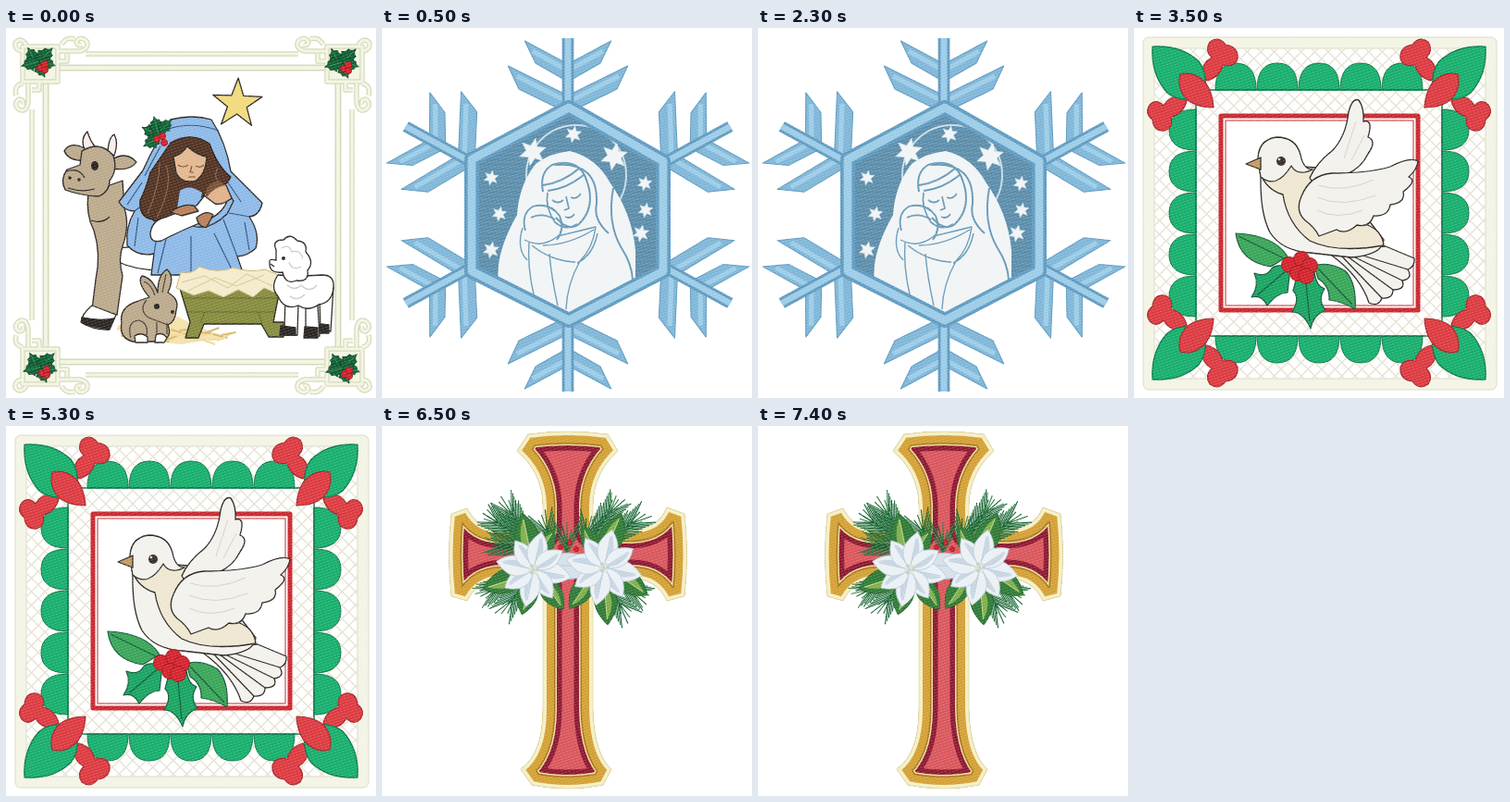
Write an HTML page that moves like this. It is 400 px wide and 400 px high and loops after 8000 ms.

```html
<!DOCTYPE html>
<html lang="en">
<head>
<meta charset="utf-8">
<title>Christmas embroidery</title>
<style>
html, body { margin: 0; width: 100%; height: 100%; overflow: hidden; background: #fff; }
svg { display: block; width: 100%; height: 100%; }
</style>
</head>
<body>
<svg id="stage" viewBox="0 0 400 400" fill="none" stroke-linejoin="round"></svg>
<script>
const path = (d, fill = 'none', stroke = 'none', width = 1.2, more = '') =>
  `<path d="${d}" fill="${fill}" stroke="${stroke}" stroke-width="${width}" ${more}/>`;
const dot = (x, y, r, fill, stroke = 'none', ry = r) =>
  `<ellipse cx="${x}" cy="${y}" rx="${r}" ry="${ry}" fill="${fill}" stroke="${stroke}"/>`;
const group = (transform, s) => `<g transform="${transform}">${s}</g>`;
const inked = (d, fill) => path(d, fill, '#292522', 1.3);
const satin = (d, dark, light, w) => path(d, 'none', dark, w) + path(d, 'none', light, w * .55);
const range = (n, f) => Array.from({ length: n }, (_, i) => f(i)).join('');
// Repeats a top-left motif in all four corners around (cx, cy).
const corners = (s, cx, cy) => [[1, 1], [-1, 1], [1, -1], [-1, -1]].map(([a, b]) =>
  group(`translate(${cx} ${cy}) scale(${a} ${b}) translate(${-cx} ${-cy})`, s)).join('');

function star(x, y, r, inner, n, turn = 0) {
  return 'M' + Array.from({ length: 2 * n }, (_, i) => {
    const a = turn + i * Math.PI / n, q = i % 2 ? inner : r;
    return `${(x + q * Math.sin(a)).toFixed(1)},${(y - q * Math.cos(a)).toFixed(1)}`;
  }).join('L') + 'Z';
}

const hollyLeaf = (x, y, turn, size) => group(`translate(${x} ${y}) rotate(${turn}) scale(${size})`,
  path('M0 0L4-6Q7-4 9-8Q11-4 15-5Q15-1 20 0Q15 1 15 5Q11 4 9 8Q7 4 4 6Z', '#0d5f33', '#07401f', .8) +
  path('M1 0H17', 'none', '#35915a', .8));
const berries = (list, r) => list.map(([x, y]) => dot(x, y, r, '#d3222b', '#a5121b')).join('');

function nativity() {
  const tan = '#bba98b', blue = '#8db9e8', edge = '#d3d9b8', pale = '#f3f5e2';
  const line = d => satin(d, edge, pale, 5.5);
  const frame = line('M28 88V316M374 88V316M86 28H316M86 375H316') +
    satin('M43 43H359V361H43Z', edge, pale, 7) +
    corners(path('M18 20H56V58H18Z', '#f3f5e2') +
      line('M18 20H56V58H18ZM57 25H80Q91 22 87 14Q80 8 76 15Q77 20 82 18M60 18Q65 9 74 12M24 60V80Q22 92 14 88Q7 82 14 77Q20 77 18 83M18 60Q8 62 11 73M18 25Q9 24 10 16Q16 9 22 18M56 36H66V28M36 58V67H28'), 201.5, 202.5) +
    [[36, 36], [364, 37], [38, 366], [365, 367]].map(([x, y]) =>
      hollyLeaf(x - 3, y + 3, -118, 1) + hollyLeaf(x - 2, y + 2, -45, 1.15) + hollyLeaf(x - 2, y, 65, .95) +
      hollyLeaf(x, y, 165, 1) + hollyLeaf(x, y, 15, .9) +
      berries([[x + 1, y + 7], [x + 6, y + 9], [x + 6, y + 3]], 3.6)).join('');

  const cow = inked('M112 240Q145 232 168 245V262Q140 262 119 252Z', '#fff') +
    inked('M89 178Q86 202 95 219Q103 244 97 272L93 304L120 310L126 268Q121 250 126 236Q134 213 128 195L126 165Z', tan) +
    inked('M85 132Q80 119 88 112Q91 122 96 128ZM110 134Q111 118 117 115Q122 124 117 138Z', '#f8eeea') +
    inked('M88 143Q68 145 63 133Q69 122 85 130ZM113 143Q130 132 141 145Q134 155 115 152Z', tan) +
    inked('M82 133Q102 121 116 138Q121 154 112 165Q112 177 100 182Q80 181 64 175Q58 164 66 153L80 148Z', tan) +
    path('M65 155Q79 150 85 162M67 173Q83 178 96 174M92 208Q104 212 112 204', 'none', '#292522') +
    dot(96, 149, 4, '#28211d', 'none', 5) + dot(69, 162, 1.8, '#28211d') + dot(79, 164, 1.8, '#28211d') +
    inked('M93 300Q82 309 81 318Q95 327 112 326L119 310Z', '#fff') +
    inked('M82 313Q80 320 87 321L111 326L117 314Q101 317 82 313Z', '#292522');

  const mary =
    inked('M178 99Q202 93 222 99Q238 124 243 155L277 189Q274 203 263 204Q275 222 270 238Q262 246 250 247L257 267H157L160 244Q143 248 131 235Q129 215 139 198Q128 198 122 188L148 154Q163 121 178 99Z', blue) +
    path('M173 110Q200 100 230 111M167 128Q158 144 150 160M139 198L149 190M160 244L166 207M234 158L254 188M263 204L241 200M250 247L235 207M175 220L164 265M200 225V265M225 222L246 265M147 167L131 191M143 205L139 236M258 210L263 240', 'none', '#33557d') +
    path('M178 124Q200 111 220 125Q229 150 243 161Q237 174 219 178L187 198Q174 219 158 207Q143 204 145 186Q151 175 156 156Z', '#513222', '#2d1a12') +
    path('M166 146Q166 170 153 201M173 148Q181 170 163 205M229 151Q222 164 235 169', 'none', '#956b4d', 1) +
    path('M188 176Q198 168 212 178L209 192L184 202Z', blue) +
    inked('M181 139Q190 137 196 128Q207 138 217 139Q216 158 205 165Q191 169 184 157Z', '#e3b78f') +
    path('M186 148Q191 152 197 148M205 149Q210 152 214 148M201 149L199 156H203M197 161H205', 'none', '#76503a') +
    inked('M217 176Q234 165 246 187L239 201Q219 220 202 214L190 206L213 195Z', blue) +
    inked('M156 222Q158 207 174 204L206 192L218 177Q233 170 240 184Q236 199 219 207Q191 218 168 230Q156 233 156 222Z', '#fff') +
    inked('M214 181Q224 162 238 170L244 184Q234 192 226 190Z', '#e0b189') +
    path('M215 179Q218 167 230 165L238 170Q224 172 217 183Z', '#795036') +
    inked('M178 199Q191 189 203 192L208 198L190 203ZM206 205Q217 196 224 202L217 215Q209 217 206 205Z', '#b87f58') +
    hollyLeaf(168, 117, -155, 1.15) + hollyLeaf(165, 115, -105, 1) + hollyLeaf(166, 112, -45, .9) +
    hollyLeaf(166, 118, 150, 1) + berries([[163, 120], [169, 117], [171, 124]], 3.5);

  const straw = path('M120 322L150 312H186L205 322L238 334L190 342L128 336Z', '#f4e2ab') + range(26, i => {
    const x = 120 + i * 4.5, y = 326 + i * 7 % 13;
    return path(`M${x} ${y}L${x + 16} ${y - 9 + i * 5 % 17}`, 'none', i % 2 ? '#d9b970' : '#f0d99b', 2);
  });
  const manger = inked('M187 278H297L289 318H300V334H284L276 320H214L208 335H194L199 318Z', '#858b3c') +
    path('M191 292H294M196 307H290M210 319L215 307M277 320L273 307', 'none', '#5e662e', 1) +
    path('M184 281L189 264Q201 267 209 258Q229 266 246 259Q263 265 280 261L294 267L293 287L279 281L267 291L251 283L235 291L219 284L203 289Z', '#f3ebcb', '#ccb77c', 1) +
    path('M190 275L215 268L240 281L260 266L288 279M197 284L226 270L249 279L279 267', 'none', '#d5c58e', 1);
  const rabbit = inked('M155 291Q141 275 147 268Q158 270 164 286Q164 267 174 261Q183 269 175 286Q188 293 184 305Q183 318 175 321Q181 336 165 339H137Q122 335 125 319Q122 301 143 295Z', tan) +
    path('M149 274Q157 277 161 289M173 266L169 286M152 294Q143 305 154 313L175 321M135 335Q130 317 144 316Q156 320 151 336M163 318V334M174 319V331', 'none', '#493d31') +
    dot(163, 301, 3, '#292522') + dot(180, 307, 2, '#292522') +
    inked('M139 333Q146 328 153 334V340H140ZM162 332Q169 328 174 335L171 340H161Z', '#fff');
  const sheep = inked('M302 292L301 325L298 332H315L316 298ZM324 298V332L339 333L337 300ZM339 294L340 327L351 328L354 280Z', '#fff') +
    inked('M297 322L296 332H313V324ZM323 323L322 335H337V324ZM340 320L339 330H349V321Z', '#292522') +
    inked('M294 267Q285 280 294 290Q301 306 316 300Q327 307 338 299Q353 297 354 280Q355 267 342 267L323 268Z', '#fff') +
    inked('M292 240Q287 229 300 229Q307 221 315 230Q326 231 324 242Q334 253 326 262Q328 275 314 273Q302 278 299 264Q284 266 285 253Q284 249 292 251Z', '#fff') +
    path('M298 238Q306 233 309 242Q318 239 321 249M306 253Q309 263 319 258M304 278Q312 285 319 278Q328 287 336 278M307 290Q315 296 323 288', 'none', '#c8c8c8') +
    dot(300, 249, 2, '#292522') + path('M286 255L290 258', 'none', '#292522');
  return frame + cow + mary + straw + manger + rabbit + sheep +
    path(star(250, 82, 28, 11, 5, .04), '#f0da7c', '#292522', 1.3);
}

function snowflake() {
  const dark = '#5f9ac0', mid = '#7fb6d8', light = '#9bcce7', white = '#f1f4f5', ink = '#6799b7';
  const hex = 'M202 86L304 144V263L202 316L97 263V142Z';
  const branches = 'M0-129L61-161L50-136L0-110ZM0-163L44-188L33-164L0-144Z';
  const shine = 'M0-122L52-150M0-156L36-177';
  const side = path(branches, mid, dark, 1) + path(shine, 'none', light, 5);
  const arm = side + group('scale(-1 1)', side) + satin('M0-191V-117', dark, light, 12);
  const spark = (x, y, r) => path(star(x, y, r, r * .48, 6, .2), white, '#d5e7f0', .7);
  const madonna = path('M125 272L126 256Q129 232 146 202Q148 170 166 147Q182 135 203 133Q232 140 247 168Q270 200 274 240V274L202 309Z', white) +
    path('M174 177Q170 156 184 148Q214 139 222 167Q231 194 213 212Q202 221 188 205M174 170Q196 167 214 151M179 176Q199 174 218 159M187 148Q234 144 232 190Q228 207 245 222M250 173Q243 211 259 238Q270 255 271 272', 'none', ink, 2) +
    path('M179 178Q176 194 187 210Q199 220 211 212M184 186Q190 191 196 186M204 183Q210 186 215 179M199 182L202 195L197 197M198 204Q204 207 208 201', 'none', ink, 1.7) +
    path('M155 219Q150 201 163 193Q181 188 192 203Q198 217 189 229M161 205Q173 199 187 207', 'none', ink, 1.8) +
    path('M154 229Q173 239 190 225L231 215Q228 238 214 252Q200 277 199 304M159 232Q157 258 164 288M162 235Q183 252 209 253M174 235Q201 235 229 218M181 244Q183 269 190 300M211 254Q228 246 233 222M152 216Q145 239 157 251', 'none', ink, 1.4);
  return path(hex, '#598ba9') +
    range(40, i => path(`M99 ${100 + i * 5}H302`, 'none', '#729eb8', .7, 'clip-path="url(#hex)"')) +
    `<clipPath id="hex"><path d="${hex}"/></clipPath><circle cx="210" cy="159" r="54" stroke="#c5dce8" stroke-width="2"/>` +
    madonna + spark(163, 134, 15) + spark(251, 139, 15) +
    [[207, 115], [118, 162], [127, 201], [118, 240], [284, 168], [285, 197], [280, 222]]
      .map(([x, y], i) => spark(x, y, i % 3 ? 8 : 9)).join('') +
    range(6, i => group(`translate(201 202) scale(1.06 1) rotate(${i * 60})`, arm)) +
    satin(hex, dark, light, 16);
}

function dove() {
  const green = '#16ae6c', deep = '#087447', red = '#dc3a40', cream = '#eee6d0', white = '#f2f1ec';
  const grid = range(52, i => {
    const k = -374 + i * 14.6;
    return path(`M22 ${22 + k}L380 ${380 + k}M22 ${380 - k}L380 ${22 - k}`, 'none', '#e6e2d3', 1.4, 'clip-path="url(#quilt)"');
  });
  const scallops = [0, 90, 180, 270].map(a => group(`rotate(${a} 200 200)`,
    range(5, i => path(`M${88 + i * 45} 67Q${88 + i * 45} 38 ${110 + i * 45} 38Q${132 + i * 45} 38 ${132 + i * 45} 67Z`, green, deep, 1)) +
    path('M67 67H333', 'none', deep, 1.5))).join('');
  const corner =
    path('M73 50Q74 37 84 32Q76 24 82 15Q92 8 99 18Q113 20 112 33Q109 43 96 40Q93 53 79 57Z', red, '#a7232a') +
    path('M50 73Q37 74 32 84Q24 76 17 83Q11 92 20 99Q21 112 33 111Q43 108 40 96Q53 93 57 79Z', red, '#a7232a') +
    path('M20 20Q51 18 70 36Q79 47 77 66L66 77Q47 79 36 70Q18 50 20 20Z', green, deep) +
    path('M50 50Q66 46 78 60Q85 70 86 86Q69 86 58 78Q46 66 50 50Z', red, '#a7232a');
  const bird =
    inked('M222 238L272 236L303 249Q304 258 296 261Q302 271 290 273Q294 283 280 283Q280 293 268 292Q264 302 254 297Q245 269 214 246Z', white) +
    path('M231 241L296 261M229 243L290 273M228 245L280 283M224 246L268 292', 'none', '#292522') +
    inked('M137 159Q136 200 147 221Q160 241 190 243L235 248Q269 245 270 229L253 207L200 151Z', white) +
    inked('M136 156Q153 165 169 149L197 151L204 178Q203 210 247 211Q268 217 270 235Q219 244 190 230Q166 212 161 180Q143 175 136 156Z', cream) +
    inked('M190 162Q197 146 215 132Q229 117 232 91Q236 75 243 78Q249 86 248 101Q259 98 253 118Q263 122 253 136Q246 151 230 158L199 176Z', white) +
    inked('M181 182Q190 159 214 157Q254 157 277 150Q298 139 307 144Q306 153 297 161Q307 165 291 177Q294 189 277 191Q275 204 259 203Q255 216 241 213Q229 224 219 218L200 225Q195 215 185 208Q174 198 181 182Z', white) +
    path('M199 170Q227 179 259 164M198 183Q225 195 261 181M198 197Q220 208 247 197M227 141L240 101M235 143L249 116', 'none', '#d3d1cb', 1) +
    inked('M134 145Q133 121 154 118Q175 118 180 137Q183 153 193 153Q177 161 170 149Q154 175 137 161Z', white) +
    inked('M137 140L121 147L137 153Z', '#c29b63') + dot(159, 144, 5, '#382c28') + dot(157, 142, 1.3, '#fff');
  const sprig =
    [['M166 247Q152 224 110 222Q114 253 148 258Z', 'M113 225L162 249'],
     ['M169 259Q153 254 148 261Q143 270 130 265Q136 278 127 291Q138 288 144 300Q155 286 166 286Z', 'M166 261L133 289'],
     ['M177 265L172 284Q180 292 171 307Q183 307 191 325Q193 311 207 305Q198 294 206 282Q197 279 195 264Z', 'M185 266L190 317'],
     ['M195 257Q211 252 229 263Q241 277 239 304Q226 296 211 294Q212 279 199 271Z', 'M199 260L236 299']]
      .map(([leaf, vein], i) => path(leaf, i % 3 ? '#17a461' : '#38a557', '#14573a') + path(vein, 'none', '#14573a')).join('') +
    berries([[168, 256], [181, 250], [190, 257], [177, 265], [186, 268]], 8.5);
  return '<clipPath id="quilt"><path d="M22 22H380V380H22Z"/></clipPath>' +
    path('M16 16H386V385H16Z', '#fff', '#dadbc2', 13) + path('M16 16H386V385H16Z', 'none', '#f3f4e5', 11) + grid +
    scallops + corners(corner, 200, 200) + path('M94 95H307V305H94Z', '#fff', '#c9272d', 5) +
    path('M99 100H302V300H99Z', 'none', '#dd686a', 1.5) + bird + sprig;
}

function cross() {
  const shape = 'M146 27L158 9Q200 3 244 9L255 27Q229 50 228 85V112H270Q299 111 308 88L327 95Q332 139 327 184L308 189Q297 165 270 165H228V306Q229 354 248 371L239 388Q200 396 162 388L150 371Q174 354 174 306V165H130Q103 166 92 189L75 184Q70 139 75 95L92 89Q103 112 130 112H174V85Q173 50 146 27Z';
  const body = `<clipPath id="cross"><path d="${shape}"/></clipPath><g clip-path="url(#cross)">` +
    path(shape, '#d9565c') + [[41, '#8c1831'], [30, '#efdca0'], [27, '#a77418'], [24, '#d3a034'], [8, '#f5efc4']]
      .map(([w, c]) => path(shape, 'none', c, w)).join('') + '</g>' + path(shape, 'none', '#e0d7a4', .8);
  const pine = (x, y, turn, length) => group(`translate(${x} ${y}) rotate(${turn})`,
    path(`M0 0H${length}`, 'none', '#526b35', 1.5) + range(Math.floor(length / 3), i => {
      const a = i * 3, r = 18 + i * 7 % 6;
      return path(`M${a} 0l${r} ${-r * .6}M${a} 0l${r} ${r * .6}M${a} 0l${r} ${r * (i % 3 - 1) * .25}`, 'none', i % 2 ? '#125a30' : '#2d7d43', 1.1);
    }));
  const leaf = (x, y, turn, size) => group(`translate(${x} ${y}) rotate(${turn}) scale(${size})`,
    path('M0 0Q9-15 24-12Q35-10 46 0Q35 10 23 12Q10 13 0 0Z', '#2f7a35', '#286a30', 1) +
    path('M3 0Q20-13 41 0Z', '#7fae4c') + path('M2 0H40', 'none', '#c2d587', 1));
  const flower = (x, y, size) => group(`translate(${x} ${y}) scale(${size})`,
    range(8, i => group(`rotate(${i * 45 + 12}) scale(${i % 2 ? .9 : 1})`,
      path('M0 0Q12-14 25-10Q33-7 40 0Q31 9 22 10Q10 10 0 0Z', '#eaf0f4', '#b8c9d7', .8) +
      path('M2 0Q17 11 35 1Z', '#c6d5e2') + path('M4 0H33', 'none', '#b0c5d7', .8))) +
    range(6, i => dot(4 * Math.cos(i * 1.05), 4 * Math.sin(i * 1.05), 1.8, i % 2 ? '#dfe3c8' : '#c3cfc0')));
  return body +
    [[158, 125, 212, 42], [156, 120, 238, 34], [154, 133, 190, 28], [184, 128, 250, 18], [142, 166, 153, 27], [150, 176, 128, 20],
     [226, 122, 305, 40], [242, 124, 326, 36], [218, 130, 285, 18], [200, 138, 270, 16], [255, 170, 28, 22], [247, 180, 52, 20]]
      .map(a => pine(...a)).join('') + berries([[193, 131], [203, 126], [210, 133]], 2.5) +
    [[162, 144, -102, 1.1], [167, 143, -58, .8], [155, 161, 162, 1.05], [162, 164, 105, .9], [172, 165, 54, .9],
     [240, 139, -67, 1.05], [234, 141, -118, .8], [249, 157, 34, 1], [240, 169, 85, 1], [226, 163, 124, .9]]
      .map(a => leaf(...a)).join('') +
    path('M180 143Q205 131 222 145L218 163Q198 169 180 160Z', '#d5e1ea', '#b4c7d8') +
    path('M180 151H218', 'none', '#b4c7d8') + flower(164, 155, 1.03) + flower(240, 153, 1.04);
}

// Scenes with the time at which each one ends; fine stitches lie over all of them.
const scenes = [[nativity, 500], [snowflake, 3500], [dove, 6500], [cross, 8000]];
const stage = document.getElementById('stage');
stage.innerHTML = scenes.map(([draw]) => `<g class="scene" display="none">${draw()}</g>`).join('') +
  `<pattern id="stitch" width="4" height="3" patternUnits="userSpaceOnUse" patternTransform="rotate(-18)">
  <path d="M0 .5H3" stroke="#fff" stroke-opacity=".2"/></pattern><rect width="400" height="400" fill="url(#stitch)"/>`;
const layers = stage.querySelectorAll('.scene');

function show() {
  const t = performance.now() % 8000;
  const current = scenes.findIndex(([, end]) => t < end);
  layers.forEach((g, i) => g.setAttribute('display', i === current ? 'inline' : 'none'));
  requestAnimationFrame(show);
}
show();
</script>
</body>
</html>
```
